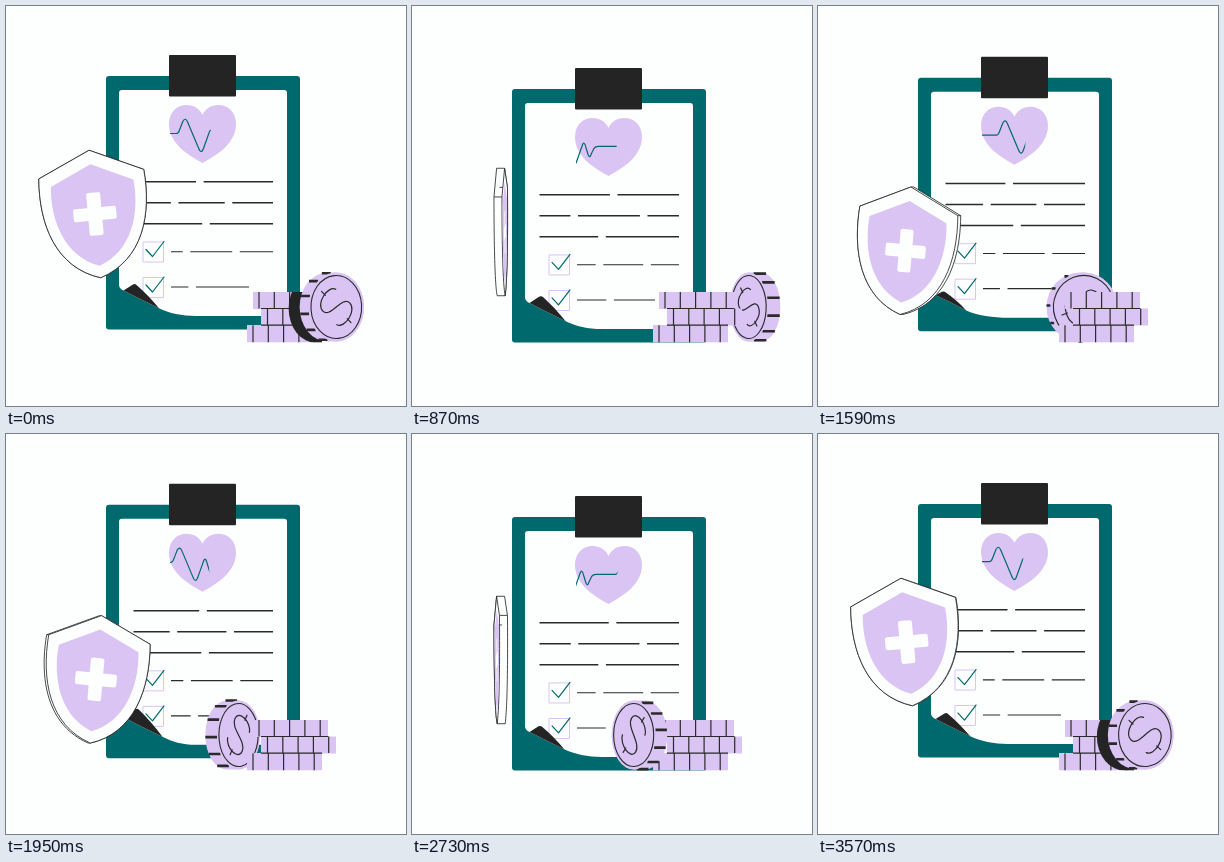
Write an HTML page that moves like this. It is 400 px wide and 400 px high and loops after 3600 ms.

```html
<!DOCTYPE html>
<html lang="en">
<head>
<meta charset="utf-8">
<title>Health cover</title>
<style>
  html, body { margin: 0; width: 100%; height: 100%; overflow: hidden; background: #fdfffe; }
  svg { display: block; width: 100vw; height: 100vh; }
  .ink { fill: none; stroke: #2a2a2a; stroke-linejoin: round; }
  .teal { fill: none; stroke: #00696d; stroke-width: 1.2; stroke-linejoin: round; stroke-linecap: round; }
  .lilac { fill: #d9c4f4; }
  .dark { fill: #242424; }
  .paper { fill: #fdfffe; }
  .rim { fill: #fdfffe; stroke: #2a2a2a; stroke-width: .85; stroke-linejoin: round; }
  .fixed { vector-effect: non-scaling-stroke; }
</style>
</head>
<body>
<svg viewBox="0 0 400 400" xmlns="http://www.w3.org/2000/svg">
  <defs>
    <clipPath id="pulseBox"><rect id="trim" x="164" y="95" width="41" height="65"/></clipPath>
    <clipPath id="stackBox">
      <rect x="247" y="286" width="75" height="16.5"/>
      <rect x="255" y="302.5" width="75" height="16.8"/>
      <rect x="241" y="319" width="75" height="17.3"/>
    </clipPath>
  </defs>

  <g id="board">
    <rect x="100" y="70" width="194" height="253.5" rx="3" fill="#00696d"/>
    <path id="sheet" class="paper"/>
    <path class="lilac" d="M196.5 157C186 151 163 139 163 118C163 106 171 99 180.5 99C188 99 194 103 196.5 109C199 103 205 99 212.5 99C222 99 230 106 230 118C230 139 207 151 196.5 157Z"/>
    <g clip-path="url(#pulseBox)"><path id="pulse" class="teal"/></g>
    <path id="rules" class="ink" stroke-width="1.5"/>
    <path id="items" class="ink" stroke-width="1.1"/>
    <path d="M137 236h20.5v20h-20.5zM137 271.5h20.5v20h-20.5z" fill="none" stroke="#d9c4f4"/>
    <path class="teal" d="M140 243.5l6.5 7L158 235.500M140 279l6.5 7L158 271"/>
    <path id="flap" class="dark"/>
    <rect class="dark" x="163" y="49" width="67" height="41.5" rx="1"/>
  </g>

  <g id="money">
    <g id="stack">
      <rect class="lilac" x="247" y="286" width="75" height="17"/>
      <rect class="lilac" x="255" y="302.5" width="75" height="17"/>
      <rect class="lilac" x="241" y="319" width="75" height="17.3"/>
      <path id="ticks" class="ink" stroke-width="1.2"/>
    </g>
    <g clip-path="url(#stackBox)"><path id="shade" class="dark"/></g>
    <g id="coin">
      <path id="body" class="lilac"/>
      <path id="ridges" class="ink" stroke-width="2.6"/>
      <g id="face">
        <circle class="lilac" r="34.5"/>
        <circle class="ink fixed" r="31.5" stroke-width="1.1"/>
        <path class="ink fixed" stroke-width="1.2" stroke-linecap="round" d="M13 -12C10 -22 -14 -22 -14 -10C-14 2 14 -2 14 10C14 22 -10 22 -13 12M0 -18V-24M0 18V24"/>
      </g>
    </g>
  </g>

  <g id="shield">
    <path id="hull" class="rim"/>
    <g id="plate">
      <path id="outer" class="rim fixed"/>
      <path id="inner" class="lilac"/>
      <path class="paper" d="M-5 -21.5H5Q7 -21.5 7 -19.5V-6.5H19.5Q21.5 -6.5 21.5 -4.5V4.5Q21.5 6.5 19.5 6.5H7V19.5Q7 21.5 5 21.5H-5Q-7 21.5 -7 19.5V6.5H-19.5Q-21.5 6.5 -21.5 4.5V-4.5Q-21.5 -6.5 -19.5 -6.5H-7V-19.5Q-7 -21.5 -5 -21.5Z"/>
    </g>
  </g>
</svg>
<script>
const LOOP = 3600, HALF = 1800, TAU = Math.PI * 2, RAD = Math.PI / 180;
const el = {};
document.querySelectorAll('[id]').forEach(n => el[n.id] = n);
const set = (n, d) => n.setAttribute('d', d);
const move = (n, v) => n.setAttribute('transform', v);
const mix = (a, b, k) => a + (b - a) * k;
const wave = (t, peak) => Math.cos(TAU * (t - peak) / HALF);
const solid = c => Math.abs(c) < .004 ? .004 : c;

// ---- static shapes ----
const BEAT = 68;
const beat = 'L-9 0Q-7 0 -6 -3L-2.5 -12Q0 -17 2.5 -11L13 14Q16 22 18.5 14L23.5 0'
  + 'Q25.5 -7 27.5 1L29 6Q31 14 33 7L35.5 2Q37 0 40 0';
const shift = (d, dx) => d.replace(/(-?[\d.]+) (-?[\d.]+)/g, (m, x, y) => `${+x + dx} ${y}`);
set(el.pulse, 'M-90 0' + [-BEAT, 0, BEAT].map(dx => shift(beat, dx)).join(''));

const tickRow = (x, y, h) => [0, 1, 2, 3, 4].map(i => `M${x + i * 15.3} ${y}v${h}`).join('');
set(el.ticks, tickRow(253, 286, 16.5) + tickRow(261.5, 302.5, 16.5) + tickRow(247, 319.2, 17)
  + 'M255 302.5H322M255 319.2H316');

const shieldPath = (top, w, y, c, low) =>
  `M0 ${top}L${w} ${y}C${c[0]} ${c[1]} ${c[2]} ${c[3]} 0 ${low}C${-c[2]} ${c[3]} ${-c[0]} ${c[1]} ${-w} ${y}Z`;
const bend = [56.5, 5, 44, 50];
set(el.outer, shieldPath(-64, 52.7, -40, bend, 64));
set(el.inner, shieldPath(-50, 41.4, -31, [45, 4, 33, 40], 52));

// One side of the shield outline, tilted in its own plane
const TILT = -5.2;
function chain(side) {
  const flat = [[0, -64]];
  for (let i = 0; i <= 24; i++) {
    const u = i / 24, v = 1 - u;
    const a = v * v * v, b = 3 * v * v * u, c = 3 * v * u * u, d = u * u * u;
    flat.push([a * 52.7 + b * bend[0] + c * bend[2], a * -40 + b * bend[1] + c * bend[3] + d * 64]);
  }
  const co = Math.cos(TILT * RAD), si = Math.sin(TILT * RAD);
  return flat.map(([x, y]) => [side * x * co - y * si, side * x * si + y * co]);
}
const right = chain(1), left = chain(-1);

// ---- moving parts ----
function dashes(y, start, end, ...gaps) {
  let x = start, d = '';
  for (const g of gaps) {
    d += `M${x} ${y}H${g - 3.8}`;
    x = g + 3.8;
  }
  return d + `M${x} ${y}H${end}`;
}

function drawBoard(t) {
  const sway = Math.sin(TAU * t / HALF);
  move(el.board, `translate(0 ${6.5 * (1 - wave(t, 0))})`);

  // Curled corner: left end, tip and right end of the fold
  const k = .5 + .5 * sway;
  const tx = mix(124.5, 133.5, k), ty = mix(286, 269, k);
  const ly = mix(289, 280, k), ex = mix(146, 160, k), ey = mix(303, 301.5, k);
  const crease = `Q${mix(130, 136, k)} ${mix(294, 291, k)} 117.5 ${ly}`;
  set(el.sheet, `M116 84H278Q281 84 281 87V310H190C176 310 ${ex + 10} ${ey + 5} ${ex} ${ey}`
    + `${crease}Q113 ${ly - 2} 113 ${ly - 6}V87Q113 84 116 84Z`);
  set(el.flap, `M117.5 ${ly}L${tx - 2} ${ty + 1}Q${tx} ${ty} ${tx + 1.5} ${ty + 1.5}`
    + `Q${mix(tx, ex, .5) + 1} ${mix(ty, ey, .5) - 1} ${ex} ${ey}${crease}Z`);

  move(el.pulse, `translate(${179.3 - BEAT * (t % HALF) / HALF} 127.5)`);
  el.trim.setAttribute('width', 41 - 3.5 * sway);

  const a = wave(t, 620), b = wave(t, 770), c = wave(t, 870);
  set(el.rules, dashes(175.8, 127.5, 267, 197.5 + 6.5 * a)
    + dashes(196.8, 127.5, 267, 165.5 - 3.5 * b, 227 + 5 * b)
    + dashes(217.8, 127.5, 267, 195 - 5 * c));
  set(el.items, dashes(245.8, 165, 267, 184 + 3.5 * c, 232.5 + 2.5 * c)
    + dashes(281, 165, 243, 192 + 6.5 * b));
}

function drawShield(t) {
  const q = TAU * t / LOOP, c = solid(Math.cos(q)), s = Math.sin(q);
  const dir = Math.sign(c), near = 4 * s * dir, half = 4 * Math.abs(s) * dir;
  move(el.shield, `translate(88.9 ${208 + 19 * (1 - Math.cos(q))})`);
  move(el.plate, `translate(${near} 0) scale(${c} 1) rotate(${TILT})`);
  const pts = right.map(([x, y]) => [x * c + half, y])
    .concat(left.map(([x, y]) => [x * c - half, y]).reverse());
  const corner = ([x, y]) => `M${x * c - near} ${y}H${x * c + near}`;
  set(el.hull, 'M' + pts.map(p => p.map(v => v.toFixed(2)).join(' ')).join('L') + 'Z'
    + corner(right[1]) + corner(left[1]));
}

function drawCoin(t) {
  const R = 34.5, DEPTH = 7.5, cy = 301;
  const deg = 36.5 + 360 * t / LOOP, q = deg * RAD;
  const c = solid(Math.cos(q)), s = Math.sin(q), front = c > 0;
  const x = 283 + 72 * s, rx = Math.abs(c) * R, near = DEPTH * s * Math.sign(c);
  const spin = deg + 94, e = Math.abs(near);

  const drum = (ox, oy) => `M${x - e + ox} ${cy - R + oy}H${x + e + ox}`
    + `A${rx} ${R} 0 0 1 ${x + e + ox} ${cy + R + oy}H${x - e + ox}`
    + `A${rx} ${R} 0 0 1 ${x - e + ox} ${cy - R + oy}Z`;
  set(el.body, drum(0, 0));
  set(el.shade, front ? drum(-11, 1.5) : '');

  let d = '';
  for (let i = 0; i < 12; i++) {
    const a = (spin + 8 + 30 * i) * RAD, px = x + R * c * Math.cos(a);
    if (s * Math.cos(a) < 0) d += `M${px - near} ${cy + R * Math.sin(a)}H${px + near}`;
  }
  set(el.ridges, d);

  // Both faces carry a readable sign
  move(el.face, `translate(${x + near} ${cy}) scale(${Math.abs(c)} 1) rotate(${front ? spin : -spin})`);

  if (front !== (el.money.lastElementChild === el.coin)) {
    if (front) el.money.appendChild(el.coin);
    else el.money.insertBefore(el.coin, el.stack);
  }
}

function draw(now) {
  const t = now % LOOP;
  drawBoard(t);
  drawShield(t);
  drawCoin(t);
}

let begin = null;
function tick(now) {
  if (begin === null) begin = now;
  draw(now - begin);
  requestAnimationFrame(tick);
}
draw(0);
requestAnimationFrame(tick);
</script>
</body>
</html>
```
